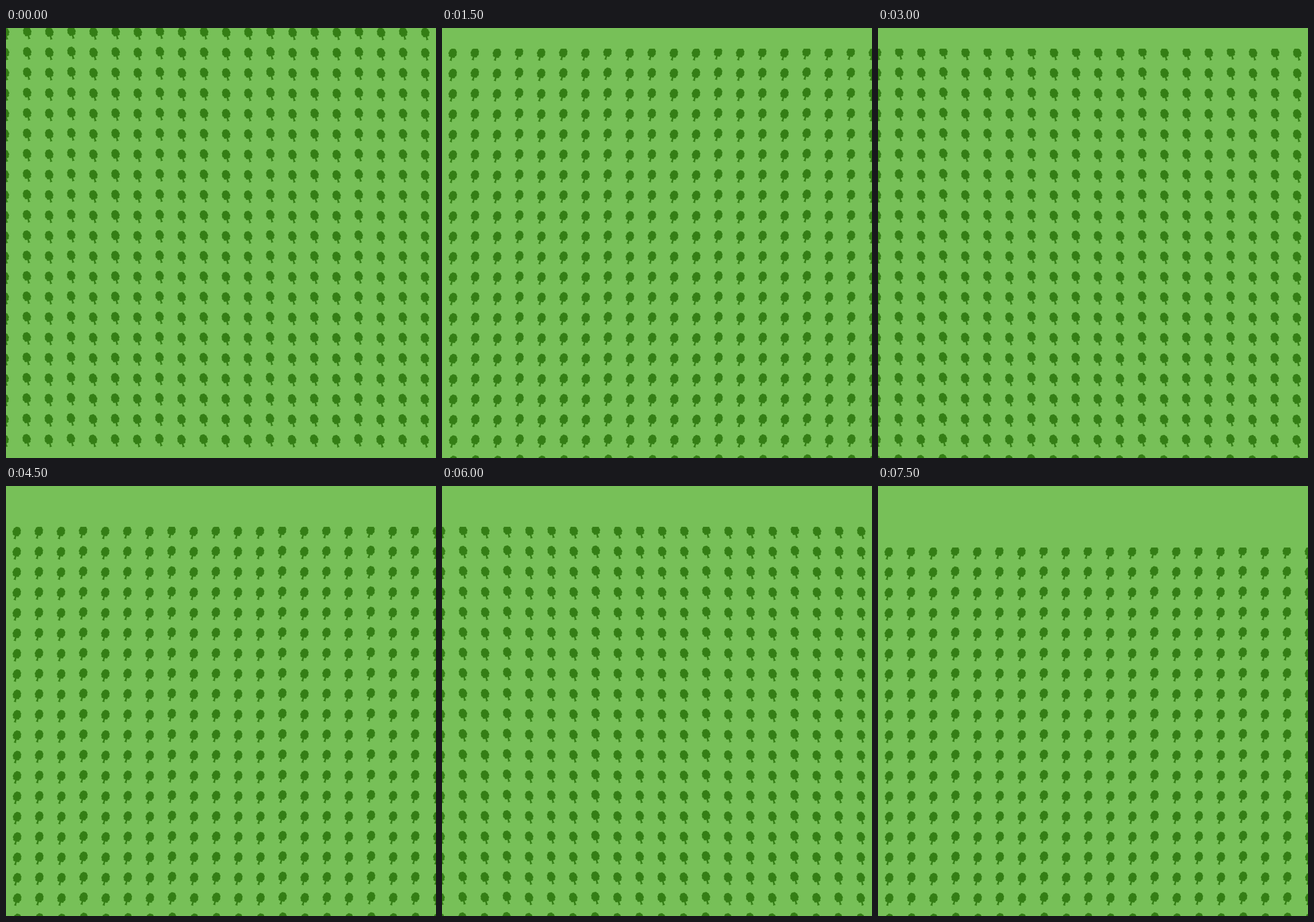
An HTML page with a canvas that plays this animation: 748x748 px, repeating every 8 s.

```html
<!DOCTYPE html>
<html lang="en">
<head>
<meta charset="utf-8">
<title>Swaying trees</title>
<style>
html, body { margin: 0; width: 100%; height: 100%; overflow: hidden; background: #77c058; }
canvas { display: block; }
</style>
</head>
<body>
<canvas id="stage" width="748" height="748"></canvas>
<script>
const SIZE = 748, LOOP = 8000, BEAT = 1500;
const COLS = 20, ROWS = 21, DX = 38.47, DY = 35.43;
const LEAN = 16 * Math.PI / 180, SLANT = 0.0014;
const ctx = document.getElementById('stage').getContext('2d');

// Right half of an upright tree, from the top of the crown to the foot.
const half = [
  [0, -9], [2.8, -8.9], [4.4, -7.4], [4.8, -6.2], [6.2, -5.6], [6.6, -3.2],
  [6.5, -1.9], [7.3, -0.8], [7.1, 2.2], [5.5, 3.3], [5.7, 5.6], [3.4, 7],
  [1.4, 6.6], [1.4, 10.6], [2.3, 12.7]
];

function treePath() {
  const path = new Path2D();
  half.forEach(([x, y]) => path.lineTo(x, y));
  [...half].reverse().forEach(([x, y]) => path.lineTo(-x, y));
  path.closePath();
  return path;
}

const tree = treePath();

// Columns bob in a four-column rhythm that skips a beat midway.
function bob(col) {
  const phase = Math.PI * (col <= 10 ? col : col + 3);
  return 0.6 * Math.cos(phase) + 0.4 * Math.sin(phase / 2);
}

function drawTree(col, row, side) {
  const left = side < 0;
  const baseX = (left ? -1.4 : 18.4) + col * DX;
  const baseY = (left ? 42.5 : 44) + (row - 1) * DY + bob(col);
  ctx.save();
  ctx.translate(baseX + side * SLANT * baseY, baseY - side * SLANT * baseX);
  ctx.rotate(side * LEAN);
  ctx.fill(tree);
  ctx.restore();
}

function draw(time) {
  const step = Math.floor((time % LOOP) / BEAT);
  const side = step % 2 ? 1 : -1;
  const shift = Math.ceil(step / 2);
  const top = Math.round(shift * 35.5);

  ctx.fillStyle = '#77c058';
  ctx.fillRect(0, 0, SIZE, SIZE);
  ctx.save();
  ctx.beginPath();
  ctx.rect(0, top, SIZE, SIZE);
  ctx.clip();
  ctx.fillStyle = '#347e15';
  for (let row = shift; row < shift + ROWS; row++) {
    for (let col = 0; col < COLS; col++) drawTree(col, row, side);
  }
  ctx.restore();
}

const start = performance.now();
function tick() {
  draw(performance.now() - start);
  requestAnimationFrame(tick);
}
tick();
</script>
</body>
</html>
```
